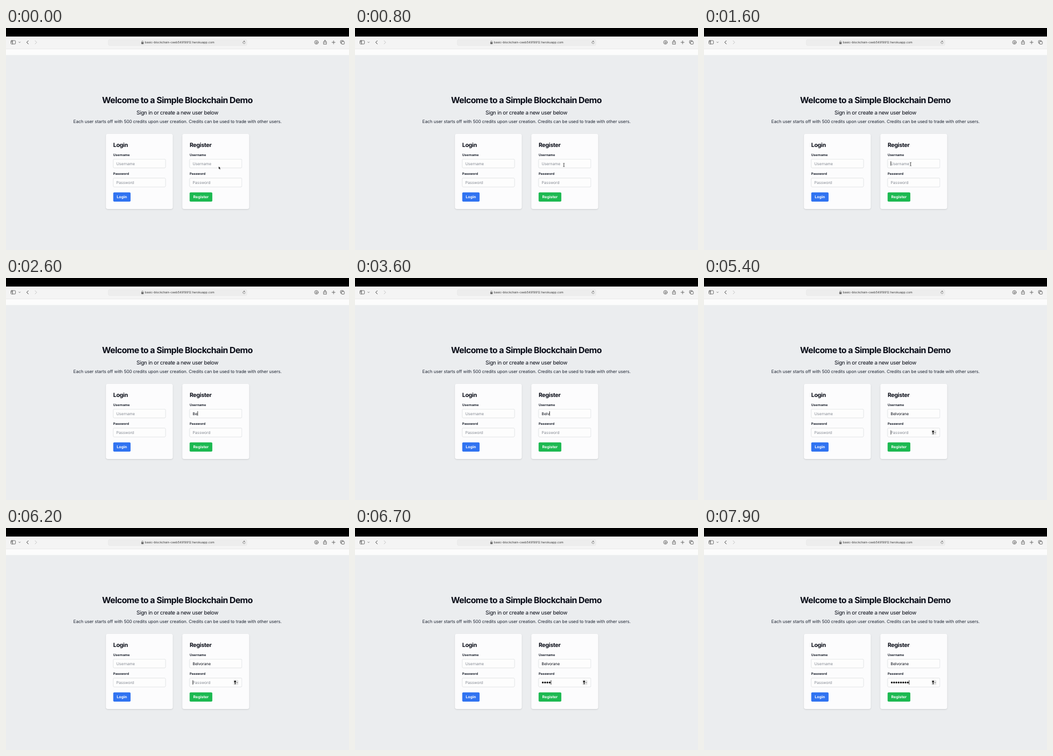
An HTML page that plays this animation: 600 by 390 pixels, repeating every 8 s.

```html
<!DOCTYPE html>
<html lang="en">
<head>
<meta charset="utf-8">
<title>Blockchain demo sign-up</title>
<style>
  html, body { margin: 0; width: 100%; height: 100%; overflow: hidden; background: #ebedef; }
  svg { display: block; width: 600px; height: 390px; }
  text { font-family: Inter, Roboto, sans-serif; fill: #090c17; text-rendering: geometricPrecision; }
  .title { font-size: 15px; font-weight: 700; letter-spacing: -.037em; }
  .sub { font-size: 9.4px; letter-spacing: -.03em; }
  .note { font-size: 7.7px; letter-spacing: -.01em; fill: #202735; }
  .head { font-size: 10px; font-weight: 700; letter-spacing: -.03em; }
  .label { font-size: 5.75px; font-weight: 700; fill: #1a202c; }
  .field { font-size: 6.8px; letter-spacing: -.01em; }
  .hint { fill: #858a93; }
  .button { font-size: 6.65px; font-weight: 700; fill: #fff; }
  .url { font-size: 5.27px; fill: #383838; }
  .mid { text-anchor: middle; }
  .icon { fill: none; stroke: #545454; stroke-width: .8; stroke-linecap: round; stroke-linejoin: round; }
  .card { fill: #fcfcfd; filter: drop-shadow(0 1px 1.2px rgba(0, 0, 0, .13)); }
  .box { fill: #fdfdfd; stroke: #e0e2e5; stroke-width: .6; filter: drop-shadow(0 .6px .5px rgba(0, 0, 0, .14)); }
</style>
</head>
<body>
<svg viewBox="0 0 600 390">
  <rect width="600" height="390" fill="#ebedef"/>
  <rect width="600" height="15" fill="#000"/>
  <rect y="15" width="600" height="22" fill="#f4f4f4"/>
  <rect y="37" width="600" height="10.5" fill="#fcfcfc"/>
  <rect y="36.6" width="600" height=".6" fill="#e2e2e2"/>

  <rect x="179" y="20.2" width="242.4" height="10.6" rx="2.5" fill="#ededed" stroke="#e2e2e2" stroke-width=".5"/>
  <text class="url" x="243" y="27.3">basic-blockchain-ceeb54919912.herokuapp.com</text>
  <rect x="236.7" y="25" width="4" height="3.2" rx=".6" fill="#666"/>
  <g class="icon">
    <path d="M237.5 25v-1a1.2 1.2 0 0 1 2.4 0v1" stroke-width=".6"/>
    <path d="M418.2 24.2a2.1 2.1 0 1 0 .3 1.8M416.3 22.4l1.3 1.1-1.3 1.1" stroke-width=".6"/>
    <rect x="8.6" y="22.1" width="8" height="6" rx="1.2"/>
    <path d="M11.5 22.1v6M9.6 23.7h.8M9.6 25h.8"/>
    <path d="M22.5 24.6l1.2 1.2 1.2-1.2"/>
    <path d="M39 22.4l-2.7 2.8 2.7 2.8" stroke="#444" stroke-width="1"/>
    <path d="M51 22.4l2.7 2.8-2.7 2.8" stroke="#bcbcbc"/>
    <circle cx="543" cy="25.2" r="3.2"/>
    <path d="M543 23.4v3.4M541.7 25.6l1.3 1.3 1.3-1.3"/>
    <path d="M556.7 24h-1.3v4.4h5.2V24h-1.3M558 26.2v-4.7M556.6 22.7l1.4-1.4 1.4 1.4"/>
    <path d="M570.2 25.2h5.6M573 22.4v5.6"/>
    <rect x="586.9" y="23.6" width="4.9" height="4.8" rx=".9"/>
    <path d="M586.9 26.8H586a.8 .8 0 0 1-.8-.8V22.8a.8 .8 0 0 1 .8-.8H589.4a.8 .8 0 0 1 .8 .8v.8"/>
  </g>

  <text class="title mid" x="299.7" y="132.4">Welcome to a Simple Blockchain Demo</text>
  <text class="sub mid" x="299.8" y="152">Sign in or create a new user below</text>
  <text class="note mid" x="300" y="166.7">Each user starts off with 500 credits upon user creation. Credits can be used to trade with other users.</text>

  <g id="cards"></g>

  <g id="key">
    <rect x="397.3" y="267" width="9.2" height="8.8" rx="1.5" fill="#e5e5e5"/>
    <circle cx="400.7" cy="269.7" r="1.6" fill="#111"/>
    <path d="M400.7 270.5v4.2M400.9 273.1h.9" stroke="#111" stroke-width="1"/>
    <path d="M403.4 271.2l.9 .9 .9-.9" class="icon" stroke-width=".7"/>
  </g>
  <g id="dots" fill="#111"></g>
  <rect id="caret" width=".8" height="7.8" fill="#111"/>
  <path id="arrow" d="M0 0v5.1l1.2-1.1 .9 2 .9-.4-.9-1.9h1.6z" fill="#000" stroke="#fff" stroke-width=".4"/>
  <path id="beam" d="M-1.3-3q1 0 1.3 .6q.3-.6 1.3-.6M0-2.4v4.8M-1.3 3q1 0 1.3-.6q.3 .6 1.3 .6" fill="none" stroke="#222" stroke-width=".8"/>
</svg>
<script>
const LOOP = 8000, STEP = 100;
const NAME = 'Belvorane';
const CLICK = 1400, TAB = 4900;
const nameKeys = [2400, 2500, 2900, 3400, 3900, 4000, 4100, 4300, 4500];
const passKeys = [6300, 6400, 6600, 6700, 7000, 7300, 7500, 7900];
const presses = [CLICK, ...nameKeys, TAB, ...passKeys];
const TEXT_X = 326.6, DOT_GAP = 4;

const $ = id => document.getElementById(id);
const show = (el, on) => el.setAttribute('visibility', on ? 'visible' : 'hidden');

function field(x, y, label, id) {
  return `<text class="label" x="${x}" y="${y - 5.8}">${label}</text>
    <rect class="box" x="${x}" y="${y}" width="91.4" height="15.4" rx="1.8"/>
    <text class="field hint" id="${id + label}" x="${x + 5.4}" y="${y + 10.1}">${label}</text>`;
}

function card(x, title, color, buttonWidth) {
  const left = x + 12.8;
  return `<rect class="card" x="${x}" y="186" width="117" height="132" rx="3.4"/>
    <text class="head" x="${left}" y="209.2">${title}</text>
    ${field(left, 230.4, 'Username', title)}
    ${field(left, 263.7, 'Password', title)}
    <rect x="${left}" y="288.8" width="${buttonWidth}" height="16.3" rx="1.8" fill="${color}"/>
    <text class="button mid" x="${left + buttonWidth / 2}" y="299.4">${title}</text>`;
}

$('cards').innerHTML = card(174.8, 'Login', '#3073f1', 30.3) + card(308.4, 'Register', '#1cb951', 39.7);
$('dots').innerHTML = passKeys.map((_, i) =>
  `<circle cx="${TEXT_X + 1.9 + i * DOT_GAP}" cy="271.4" r="1.55"/>`).join('');

const user = $('RegisterUsername'), pass = $('RegisterPassword');
const dots = [...$('dots').children];
const count = (keys, t) => keys.filter(k => k <= t).length;
const clamp = v => Math.min(1, Math.max(0, v));

// Solid after each press, then a soft blink.
function caretAlpha(t) {
  const last = presses.filter(k => k <= t).pop();
  if (last === undefined) return 0;
  const p = (t - last) % 1000;
  return p < 850 ? clamp((650 - p) / 200) : clamp((p - 850) / 150);
}

function drawPointer(t) {
  const k = clamp((t - 100) / 1200), e = k * k * (3 - 2 * k);
  const x = 372 - 10.6 * e, y = 243 - 3.8 * e;
  $('arrow').setAttribute('transform', `translate(${x} ${y})`);
  $('beam').setAttribute('transform', `translate(${x} ${y})`);
  show($('arrow'), t < 200);
  show($('beam'), t >= 200 && t < nameKeys[0]);
}

function draw(t) {
  const typed = count(nameKeys, t), hidden = count(passKeys, t), inPass = t >= TAB;
  user.textContent = typed ? NAME.slice(0, typed) : 'Username';
  user.classList.toggle('hint', !typed);
  show(pass, !hidden);
  dots.forEach((d, i) => show(d, i < hidden));
  show($('key'), inPass);

  const nameWidth = typed ? user.getComputedTextLength() : 0;
  const caret = $('caret');
  caret.setAttribute('x', TEXT_X - .1 + (inPass ? hidden * DOT_GAP : nameWidth));
  caret.setAttribute('y', inPass ? 267.4 : 234.1);
  caret.setAttribute('opacity', caretAlpha(t));
  drawPointer(t);
}

const start = performance.now();
function tick() {
  const t = (performance.now() - start) % LOOP;
  draw(Math.floor(t / STEP) * STEP);
  requestAnimationFrame(tick);
}
tick();
</script>
</body>
</html>
```
